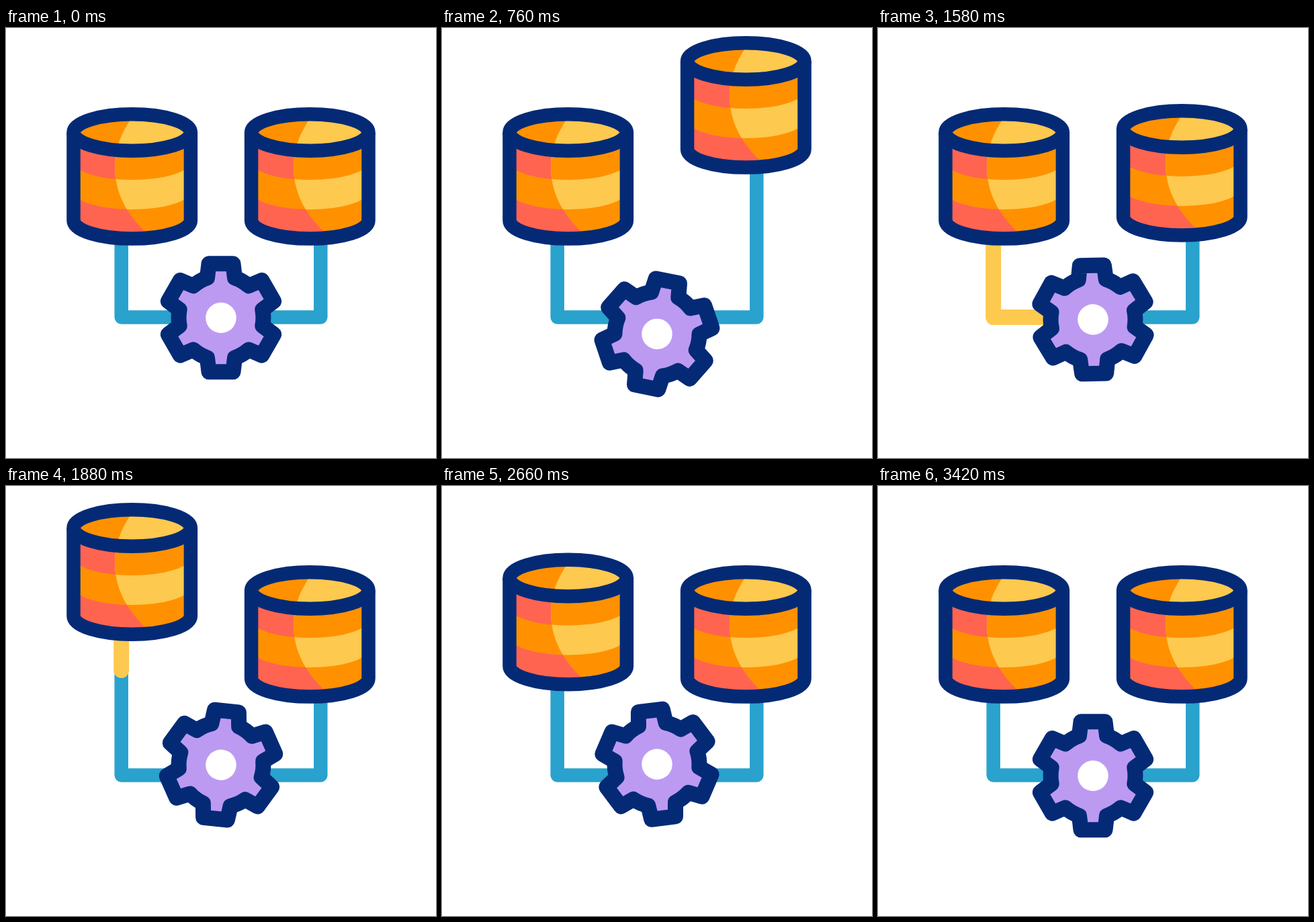
Animation, 640 px wide and 640 px high, one loop 3600 ms. Source, as an HTML page with a canvas:

```html
<!DOCTYPE html>
<html lang="en">
<head>
<meta charset="utf-8">
<title>Data sync</title>
<style>
  html, body { margin: 0; width: 100%; height: 100%; overflow: hidden; background: #fff; }
  canvas { display: block; width: 640px; height: 640px; }
</style>
</head>
<body>
<canvas id="stage" width="640" height="640"></canvas>
<script>
const ctx = document.getElementById('stage').getContext('2d');
const LOOP = 3600;
const NAVY = '#042a76', BLUE = '#29a2ce', CORAL = '#ff6450';
const ORANGE = '#ff9100', YELLOW = '#fdc94f', PURPLE = '#bc9af2';

const WIRE_Y = 430.5, WIRE_REACH = 148.3, PULSE_TOP = 192;
const PULSE_LENGTH = WIRE_REACH + WIRE_Y - PULSE_TOP;
const DISC = { rx: 87.2, ry: 27.2, top: 155.5, bottom: 286.4 };

// Eased progress from 0 to 1 between two times.
function ease(t, from, to) {
  const u = Math.min(1, Math.max(0, (t - from) / (to - from)));
  return u * u * (3 - 2 * u);
}

const discLift = t => 106 * (ease(t, 400, 760) - ease(t, 800, 1700));
const gearShift = t =>
  28.2 * ease(t, 0, 1000) - 53.8 * ease(t, 1000, 2200) + 25.6 * ease(t, 2200, 3400);
const gearTurn = t => Math.PI * (ease(t, 604, 1630) + ease(t, 1770, 2780));

function stroke(color, width) {
  ctx.strokeStyle = color;
  ctx.lineWidth = width;
  ctx.stroke();
}

function wirePath(side, top) {
  ctx.beginPath();
  ctx.moveTo(320, WIRE_Y);
  ctx.lineTo(320 + side * WIRE_REACH, WIRE_Y);
  ctx.lineTo(320 + side * WIRE_REACH, top);
}

function drawWire(side, lift, t) {
  wirePath(side, DISC.bottom - lift);
  stroke(BLUE, 20.5);

  const head = PULSE_LENGTH * ease(t, 0, 400);
  const tail = PULSE_LENGTH * ease(t, 400, 800);
  if (head - tail < 0.5) return;
  ctx.save();
  ctx.lineCap = 'round';
  ctx.setLineDash([head - tail, 2 * PULSE_LENGTH]);
  ctx.lineDashOffset = -tail;
  wirePath(side, PULSE_TOP);
  stroke(YELLOW, 23);
  ctx.restore();
}

function topEllipse() {
  ctx.beginPath();
  ctx.ellipse(0, DISC.top, DISC.rx, DISC.ry, 0, 0, 2 * Math.PI);
}

function bodyPath(bottom = DISC.bottom) {
  ctx.beginPath();
  ctx.moveTo(-DISC.rx, DISC.top);
  ctx.lineTo(-DISC.rx, bottom);
  ctx.ellipse(0, bottom, DISC.rx, DISC.ry, 0, Math.PI, 0, true);
  ctx.lineTo(DISC.rx, DISC.top);
  ctx.closePath();
}

// Layers from the lowest band to the lid, each painted over the last.
function paintDisc(bands, lid) {
  [DISC.bottom, 242.8, 198.8].forEach((bottom, i) => {
    bodyPath(bottom);
    ctx.fillStyle = bands[i];
    ctx.fill();
  });
  topEllipse();
  ctx.fillStyle = lid;
  ctx.fill();
}

function drawDisc(x, lift, shade) {
  ctx.save();
  ctx.translate(x, -lift);
  paintDisc([CORAL, ORANGE, CORAL], ORANGE);

  // Lit side, right of the curved edge.
  ctx.save();
  ctx.beginPath();
  ctx.moveTo(shade, 132);
  ctx.bezierCurveTo(shade - 18, 158, shade - 26, 182, shade - 26, 206);
  ctx.bezierCurveTo(shade - 26, 244, shade - 10, 276, shade + 22, 306);
  ctx.lineTo(100, 330);
  ctx.lineTo(100, 110);
  ctx.clip();
  paintDisc([ORANGE, YELLOW, ORANGE], YELLOW);
  ctx.restore();

  ctx.beginPath();
  ctx.moveTo(-DISC.rx, DISC.top);
  ctx.lineTo(-DISC.rx, DISC.bottom);
  ctx.ellipse(0, DISC.bottom, DISC.rx, DISC.ry, 0, Math.PI, 0, true);
  ctx.lineTo(DISC.rx, DISC.top);
  stroke(NAVY, 20.5);
  topEllipse();
  stroke(NAVY, 20.5);
  ctx.restore();
}

function drawGear(y, angle) {
  const root = [20.5, 59.5], tip = [18, 80.5];
  const radius = Math.hypot(...root);
  const half = Math.atan2(...root);
  ctx.save();
  ctx.translate(320, y);
  ctx.rotate(angle);
  ctx.beginPath();
  for (let i = 0; i < 6; i++) {
    ctx.lineTo(-root[0], -root[1]);
    ctx.lineTo(-tip[0], -tip[1]);
    ctx.lineTo(tip[0], -tip[1]);
    ctx.lineTo(root[0], -root[1]);
    ctx.arc(0, 0, radius, half - Math.PI / 2, Math.PI / 3 - half - Math.PI / 2);
    ctx.rotate(Math.PI / 3);
  }
  ctx.closePath();
  ctx.fillStyle = PURPLE;
  ctx.fill();
  stroke(NAVY, 23);
  ctx.beginPath();
  ctx.arc(0, 0, 22.8, 0, 2 * Math.PI);
  ctx.fillStyle = '#fff';
  ctx.fill();
  ctx.restore();
}

function draw(t) {
  ctx.fillStyle = '#fff';
  ctx.fillRect(0, 0, 640, 640);
  ctx.lineJoin = 'round';

  // The left side repeats the right side's motion 1.2 s later.
  const leftTime = t - 1200;
  const leftLift = discLift(leftTime), rightLift = discLift(t);
  drawWire(-1, leftLift, leftTime);
  drawWire(1, rightLift, t);
  drawDisc(187.7, leftLift, 0.3);
  drawDisc(452.3, rightLift, 1.7);
  drawGear(431.3 + gearShift(t), gearTurn(t));
}

const start = performance.now();
function tick() {
  draw((performance.now() - start) % LOOP);
  requestAnimationFrame(tick);
}
tick();
</script>
</body>
</html>
```
